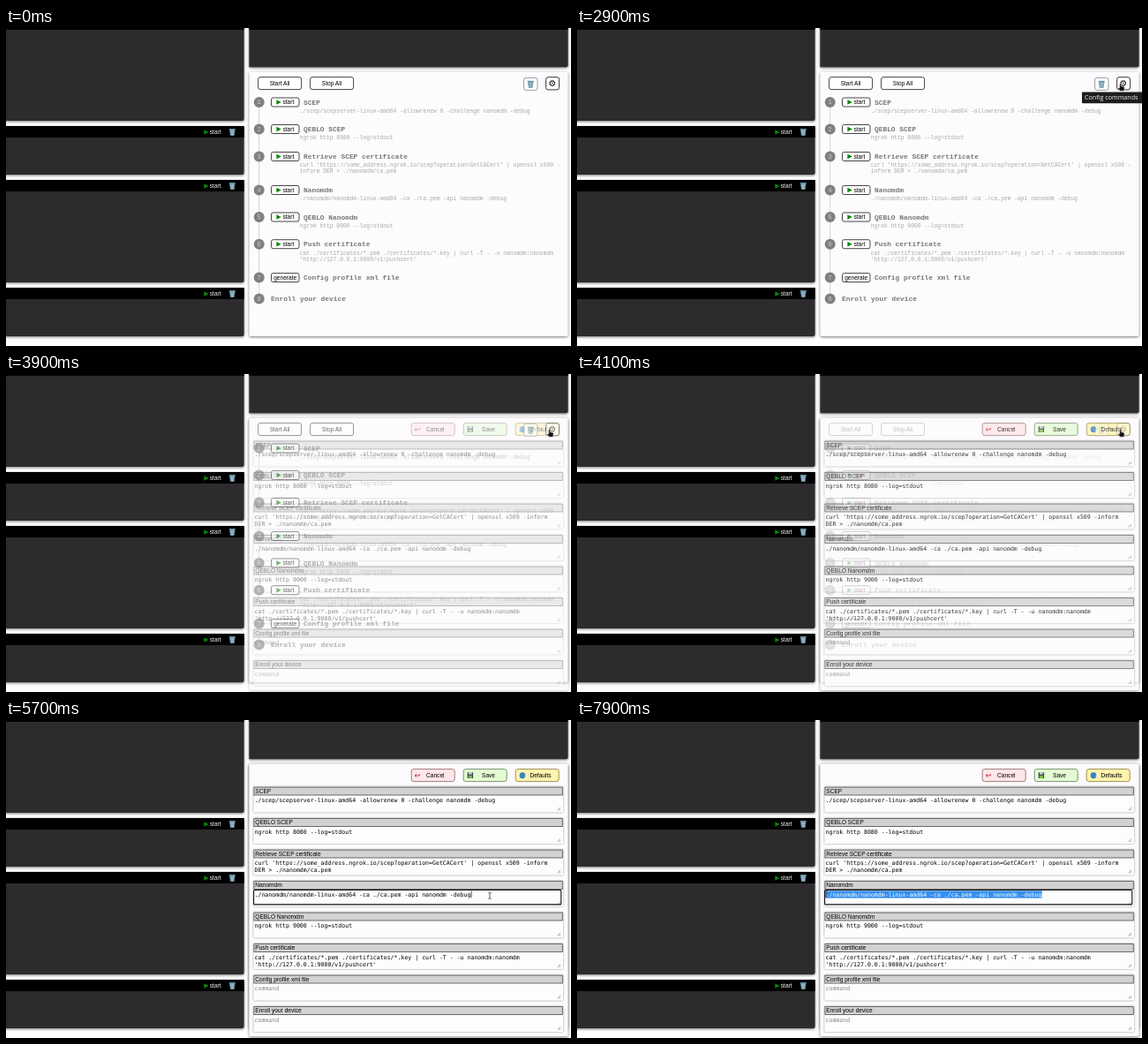
Animation of 640 by 360 pixels, one loop 8 s. Source, as an HTML page:

```html
<!DOCTYPE html>
<html lang="en">
<head>
<meta charset="utf-8">
<title>Command panel</title>
<style>
html, body { margin: 0; width: 100%; height: 100%; overflow: hidden; background: #fff; }
svg { display: block; width: 100%; height: 100%; }
text { font: 6.6px "Liberation Sans", Arial, sans-serif; white-space: pre; }
.step { font: bold 7.87px "Liberation Mono", monospace; fill: #777; }
.num { font: 7px "Liberation Mono", monospace; fill: #ccc; text-anchor: middle; }
.hint { font: 6.3px "Liberation Mono", monospace; fill: #aaa; }
.code { font: 6.57px "DejaVu Sans Mono", monospace; }
.gear { font: 10px "DejaVu Sans", sans-serif; text-anchor: middle; }
.tip { font: 7.17px "Open Sans", sans-serif; fill: #eee; }
.mid { text-anchor: middle; }
.shadow { filter: drop-shadow(0 1px 1.5px rgba(0, 0, 0, .55)); }
.soft { filter: drop-shadow(0 .8px 1px rgba(0, 0, 0, .42)); }
</style>
</head>
<body>
<svg id="stage" viewBox="0 0 640 360" xmlns="http://www.w3.org/2000/svg"></svg>
<script>
const LOOP = 8000;
const stage = document.getElementById('stage');

const steps = [
  { y: 84, title: 'SCEP', cmd: './scep/scepserver-linux-amd64 -allowrenew 0 -challenge nanomdm -debug' },
  { y: 114.5, title: 'QEBLO SCEP', cmd: 'ngrok http 8080 --log=stdout' },
  { y: 145.5, title: 'Retrieve SCEP certificate', wrap: [78, 85],
    cmd: "curl 'https://some_address.ngrok.io/scep?operation=GetCACert' | openssl x509 -inform DER > ./nanomdm/ca.pem" },
  { y: 183.5, title: 'Nanomdm', cmd: './nanomdm/nanomdm-linux-amd64 -ca ./ca.pem -api nanomdm -debug' },
  { y: 214, title: 'QEBLO Nanomdm', cmd: 'ngrok http 9000 --log=stdout' },
  { y: 244.7, title: 'Push certificate', wrap: [77, 77],
    cmd: "cat ./certificates/*.pem ./certificates/*.key | curl -T - -u nanomdm:nanomdm 'http://127.0.0.1:9000/v1/pushcert'" },
  { y: 282.6, title: 'Config profile xml file' },
  { y: 306.5, title: 'Enroll your device' }
];

const esc = s => s.replace(/&/g, '&amp;').replace(/</g, '&lt;').replace(/>/g, '&gt;');
const text = (x, y, s, cls = '', fill = '') =>
  `<text x="${x}" y="${y}" class="${cls}"${fill && ` fill="${fill}"`}>${esc(s)}</text>`;
const rect = (x, y, w, h, fill, more = '') =>
  `<rect x="${x}" y="${y}" width="${w}" height="${h}" fill="${fill}" ${more}/>`;
const path = (d, fill, more = '') => `<path d="${d}" fill="${fill}" ${more}/>`;
const group = (id, body, more = '') => `<g id="${id}" ${more}>${body}</g>`;
const play = (x, y) => path(`M${x} ${y - 2.7}l5.4 2.7l-5.4 2.7z`, '#0a850a');
const box = (x, y, w, h, fill, stroke, r = 2.5) =>
  rect(x, y, w, h, fill, `rx="${r}" stroke="${stroke}" stroke-width=".9"`);

// Split a command at a column, dropping the space at the break.
const lines = (s, at) => at ? [s.slice(0, at).trimEnd(), s.slice(at).trimStart()] : [s];

const bin = (x, y) =>
  path(`M${x - 2.9} ${y - 2.5}h5.8l-.9 6.4h-4z`, '#a9c3cf', 'stroke="#557f93" stroke-width=".6"') +
  path(`M${x - 1.2} ${y - 2}l.4 5.4M${x + 1.2} ${y - 2}l-.4 5.4M${x - 2.5} ${y + .6}h5`, 'none', 'stroke="#5f8ca2" stroke-width=".5"') +
  rect(x - 3.6, y - 3.8, 7.2, 1.5, '#6d97ab', 'rx=".7"');

function terminal(x, y, w, bottom, bar, tools) {
  const r = x + w;
  const shape = path(`M${x} ${y}H${r}V${bottom - 2}q0 2 -2 2H${x}z`, '#2d2b2e', 'class="shadow"');
  return shape + rect(x, y, w, bar, '#000') +
    (tools ? play(224.3, y + 7) + text(230.8, y + 9.2, 'start', '', '#f4f4f4') + bin(256.3, y + 6.8) : '');
}

function listView() {
  let out = box(285.6, 55.6, 49, 14, '#fff', '#333') + text(310, 65, 'Start All', 'mid') +
    box(344.6, 55.6, 49, 14, '#fff', '#333') + text(369, 65, 'Stop All', 'mid');
  out += path('M286.7 84V306', 'none', 'stroke="#c9c9c9" stroke-width=".8"');
  steps.forEach((s, i) => {
    const { y } = s;
    out += `<circle cx="286.7" cy="${y}" r="6" fill="#808080"/>`;
    out += text(286.7, y + 2.2, String(i + 1), 'num');
    if (i < 7) out += box(300.5, y - 5, 31.5, 10, '#fff', '#333', 2);
    if (i < 6) out += play(306.4, y) + text(313.4, y + 2.2, 'start');
    if (i === 6) out += text(316.2, y + 2.2, 'generate', 'mid');
    out += text(i < 7 ? 337 : 300, y + 2.5, s.title, 'step');
    if (s.cmd) lines(s.cmd, s.wrap && s.wrap[0])
      .forEach((l, n) => out += text(332.8, y + 11.8 + n * 7, l, 'hint'));
  });
  out += box(586.6, 56.4, 15.4, 14, '#fff', '#8a9298') + bin(594.2, 63.6);
  out += box(611.6, 55.7, 15, 14.2, '#fff', '#222') + text(619, 66.3, '⚙', 'gear');
  return out;
}

const rowY = i => 75.8 + i * 35.5;

function formView() {
  let out = '';
  const action = (x, fill, edge, label, tx) =>
    box(x, 55.6, 49, 14, fill, edge, 2.5) + text(tx, 65, label);
  out += action(459.2, '#fde6e9', '#98706f', 'Cancel', 476) +
    path('M468.4 61v1.9h-5M465 61.2l-1.9 1.7l1.9 1.7', 'none', 'stroke="#b3202c" stroke-width=".8"');
  out += action(518.2, '#e3fad3', '#6f8a62', 'Save', 539) +
    rect(522.7, 59.2, 6.4, 6.8, '#31454f', 'rx=".6"') + rect(524, 59.2, 3.8, 2.4, '#cfd8dc') + rect(523.8, 62.8, 4.2, 3.2, '#7cb342');
  out += action(577.2, '#fdf3ae', '#938748', 'Defaults', 593.4) +
    `<circle cx="585" cy="62.7" r="3.4" fill="#4a9fe0"/>` +
    path('M587.4 61.2q-2.5 -2.3 -4.4 0q-1 2.2 1 3.1q2.3 .3 2.3 -1.6q-.6 -1.4 -1.7 -.3M582.5 64.6q2 2 4.6 .5', 'none', 'stroke="#1c56a5" stroke-width=".8"');
  steps.forEach((s, i) => {
    const y = rowY(i);
    out += rect(280.4, y, 350.6, 28.6, '#fefdfe', 'class="soft" rx="1"');
    out += rect(280.9, y + .3, 349.4, 8.9, '#d3d2d3', 'stroke="#4a4a4a" stroke-width=".8"');
    out += text(282.3, y + 6.9, s.title);
    lines(s.cmd || 'command', s.wrap && s.wrap[1]).forEach((l, n) =>
      out += text(281.5, y + 17.5 + n * 7.8, l, 'code', s.cmd ? '#000' : '#858585'));
    out += path(`M624.6 ${y + 26.6}l3.4 -3.4M626.5 ${y + 26.6}l1.5 -1.5`, 'none', 'stroke="#666" stroke-width=".6"');
  });
  return out;
}

const editY = rowY(3), CELL = 3.955, TEXT_X = 281.5, TEXT_END = TEXT_X + 62 * CELL;
const panel = h => rect(275.4, 49.6, 361.2, h, '#fdfbfd', 'rx="2" class="shadow"');

stage.innerHTML =
  `<defs><clipPath id="clip"><rect id="clipBox" y="${editY + 9}" width="0" height="12"/></clipPath></defs>` +
  rect(0, 0, 640, 360, '#fff') +
  terminal(-20, -12, 289.6, 105, 14, false) +
  terminal(-20, 111, 289.6, 166, 13, true) +
  terminal(-20, 172, 289.6, 288, 13, true) +
  terminal(-20, 294, 289.6, 349, 13, true) +
  terminal(275.4, -12, 361.2, 44.2, 14, false) +
  panel(299.4) +
  group('tall', panel(308.6)) +
  group('form', formView()) +
  group('list', listView()) +
  group('focus',
    rect(280.6, editY + 10.2, 348.2, 16.4, 'none', 'rx="1" stroke="#111" stroke-width="1.1"') +
    `<rect id="mark" y="${editY + 11.1}" width="0" height="8.2" fill="#338ff0"/>` +
    group('picked', text(TEXT_X, editY + 17.5, steps[3].cmd, 'code', '#fff'), 'clip-path="url(#clip)"') +
    `<rect id="caret" x="${TEXT_END}" y="${editY + 11.3}" width=".7" height="7.8"/>`) +
  group('tip', rect(572, 72.6, 69, 12.6, '#1d1d1d', 'rx="1"') + text(575, 81.4, 'Config commands', 'tip')) +
  group('arrow', path('M0 0v9l2.1 -1.9l1.4 3.2l1.5 -.7l-1.4 -3.1h2.8z', '#000', 'stroke="#ddd" stroke-width=".5"')) +
  group('beam', path('M-1.7 -3.4q1.7 0 1.7 .8v5.2q0 .8 -1.7 .8M1.7 -3.4q-1.7 0 -1.7 .8M0 2.6q0 .8 1.7 .8', 'none', 'stroke="#222" stroke-width=".75"')) +
  group('hand', path('M-.9 -2.6q.9 -1 1.7 0v2.3l3 .7q.9 .3 .7 1.3l-.6 3.5h-4.2l-2.5 -3.3q.2 -1 1.9 .1z', '#111', 'stroke="#eee" stroke-width=".4"'));

const el = id => document.getElementById(id);
const show = (id, on) => el(id).setAttribute('visibility', on ? 'visible' : 'hidden');
const fade = (id, v) => el(id).setAttribute('opacity', v);
const clamp = v => Math.max(0, Math.min(1, v));

// Pointer stops: time, x, y
const stops = [
  [200, 145, 298], [1000, 342, 150], [1400, 354, 138], [2500, 615.6, 66], [4500, 615.6, 66],
  [5000, 552, 175], [5400, 548, 199], [5700, 548, 199], [6500, 371, 199],
  [7200, 545, 198], [7300, 545, 198], [7850, 282, 197]
];

function pointer(t) {
  const i = stops.findIndex(s => s[0] > t);
  if (i < 0) return stops[stops.length - 1].slice(1);
  if (i === 0) return stops[0].slice(1);
  const [t0, x0, y0] = stops[i - 1], [t1, x1, y1] = stops[i];
  const u = (t - t0) / (t1 - t0), k = u * u * (3 - 2 * u);
  return [x0 + (x1 - x0) * k, y0 + (y1 - y0) * k];
}

function render(t) {
  const k = clamp((t - 3650) / 580);
  fade('list', 1 - k);
  fade('form', k);
  fade('tall', k);
  show('tip', t >= 2900 && t < 3500);

  const [x, y] = pointer(t);
  const kind = t < 200 ? '' : t >= 2400 && t < 4550 ? 'hand' : x < 275 || y < 76 ? 'arrow' : 'beam';
  for (const id of ['arrow', 'beam', 'hand']) {
    show(id, id === kind);
    el(id).setAttribute('transform', `translate(${x} ${y})`);
  }

  show('focus', t >= 5500);
  const from = TEXT_X + CELL * Math.max(0, Math.round((x - TEXT_X) / CELL));
  const width = t >= 7300 ? Math.max(0, TEXT_END - from) : 0;
  for (const id of ['mark', 'clipBox']) {
    el(id).setAttribute('x', from);
    el(id).setAttribute('width', width);
  }
  show('caret', t >= 5500 && !width && (t - 5500) % 1000 < 500);
}

function tick(now) {
  render(now % LOOP);
  requestAnimationFrame(tick);
}
render(0);
requestAnimationFrame(tick);
</script>
</body>
</html>
```
